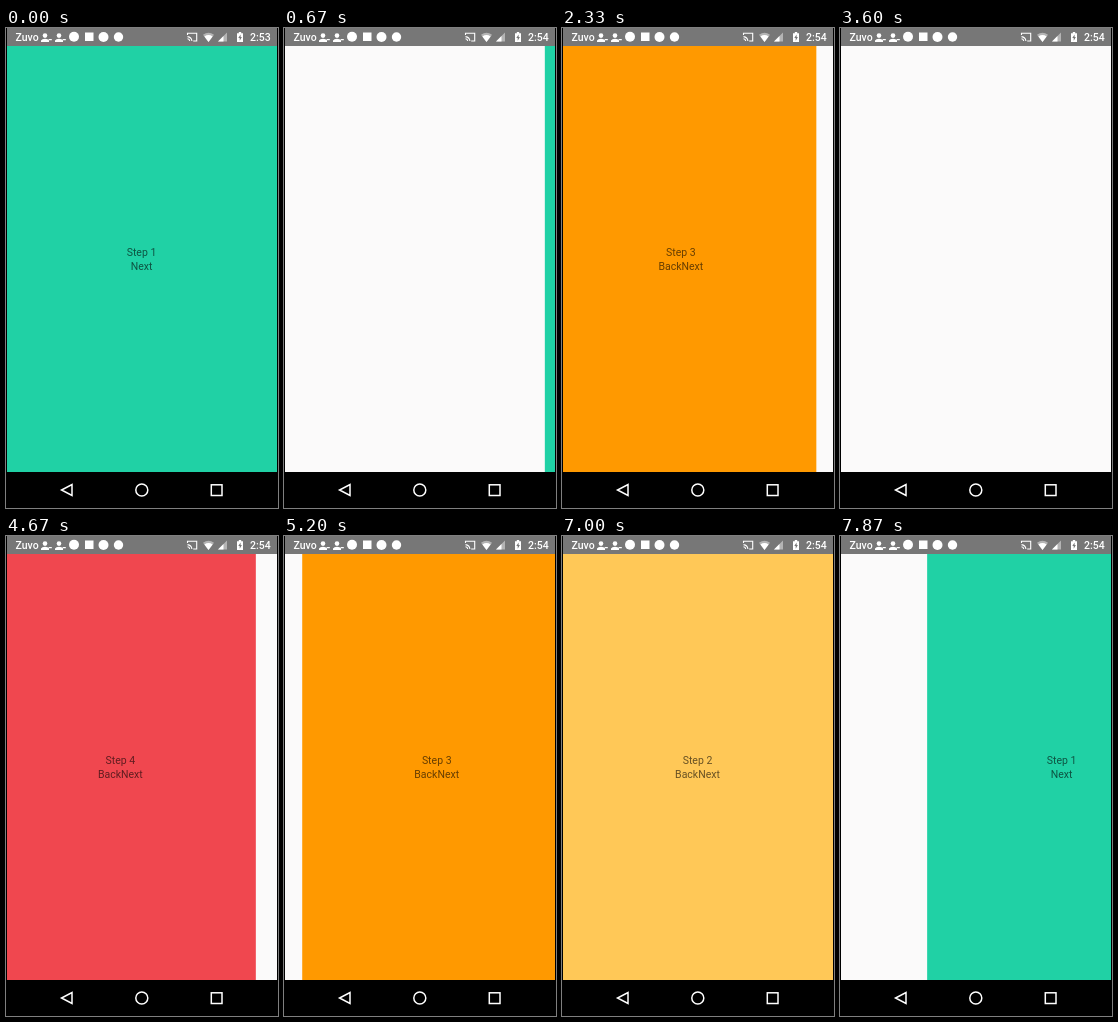
Animation of 272x480 px, one loop 7.94 s. Source, as an HTML page:

```html
<!DOCTYPE html>
<html lang="en">
<head>
<meta charset="utf-8">
<title>Step wizard</title>
<style>
  html, body { margin: 0; width: 100%; height: 100%; overflow: hidden; background: #000; }
  svg { display: block; width: 272px; height: 480px; }
  text { font: 10.5px Roboto, sans-serif; }
  #page text { text-anchor: middle; fill: rgba(0, 0, 0, .6); }
  #bar text { font-weight: 500; fill: #fff; }
</style>
</head>
<body>
<svg viewBox="0 0 272 480">
  <defs>
    <clipPath id="screen"><rect x="1" y="18" width="270" height="426"/></clipPath>
    <g id="person">
      <circle cx="4" cy="2.6" r="2.3"/>
      <path d="M0 9V7.6Q1 5.8 4 5.8T8 7.6V9ZM7.6 6h3.2v1.2H7.6Z"/>
    </g>
  </defs>

  <rect x="1" y="18" width="270" height="426" fill="#fbfafa"/>
  <g clip-path="url(#screen)">
    <g id="page">
      <rect id="fill" x="1" y="18" width="270" height="426"/>
      <text id="title" x="135.5" y="228"></text>
      <text x="135.5" y="242"><tspan id="back"></tspan><tspan id="next">Next</tspan></text>
    </g>
  </g>

  <g id="bar" fill="#fff">
    <rect x="1" width="270" height="18" fill="#777"/>
    <text x="9.5" y="13">Zuvo</text>
    <use href="#person" x="35" y="5"/>
    <use href="#person" x="49" y="5"/>
    <circle cx="68" cy="8.8" r="5"/>
    <rect x="79" y="4.5" width="8.5" height="8.5"/>
    <circle cx="97.5" cy="9" r="5"/>
    <circle cx="112.5" cy="9" r="4.7"/>
    <!-- cast, wifi, signal, battery -->
    <path d="M181.500 7V5.300h9.200v7.700h-3.500M181.500 8.600q4 .4 4.400 4.400M181.500 10.800q2 .2 2.200 2.200" fill="none" stroke="#fff" stroke-width="1.100"/>
    <path d="M197 6.700Q202.500 2.800 208 6.700L202.500 14Z" opacity=".45"/>
    <path d="M198.400 8.500Q202.500 5.700 206.600 8.500L202.500 14Z"/>
    <path d="M212 13.500 221 4.500V13.500Z" opacity=".45"/>
    <path d="M212 13.500 217.500 8V13.500Z"/>
    <path d="M231 5.200h1.800V4h2.400v1.200H237V14h-6Z"/>
    <path d="M234.600 6.500 232.300 10h1.400v2.700L235.900 9h-1.300Z" fill="#777"/>
    <text id="clock" x="244" y="13"></text>
  </g>

  <g fill="none" stroke="#fff" stroke-width="1.500">
    <path d="M66 456.500V467.500L55.500 462Z"/>
    <circle cx="135.800" cy="462" r="6"/>
    <rect x="205.300" y="456.800" width="10.700" height="10.700"/>
  </g>
</svg>
<script>
const LOOP = 7940, TICK = 200 / 3, SLIDE = 300, WIDTH = 270;
const COLORS = ['#20d1a5', '#ffc857', '#ff9900', '#f0474f'];
// step left, step entered, press, slide out, slide in (ms)
const MOVES = [
  [1, 2, 265, 440, 800],
  [2, 3, 1595, 1760, 2125],
  [3, 4, 2925, 3200, 3605],
  [4, 3, 4465, 4640, 4993],
  [3, 2, 5865, 6040, 6390],
  [2, 1, 7130, 7300, 7747]
];
const el = id => document.getElementById(id);
const [page, fill, title, back, next, clock] =
  ['page', 'fill', 'title', 'back', 'next', 'clock'].map(el);

// cubic-bezier(.25, .1, .25, 1)
function ease(p) {
  if (p <= 0) return 0;
  if (p >= 1) return 1;
  const curve = (u, a, b) => 3 * u * (1 - u) ** 2 * a + 3 * u * u * (1 - u) * b + u ** 3;
  let lo = 0, hi = 1;
  for (let i = 0; i < 20; i++) {
    const mid = (lo + hi) / 2;
    if (curve(mid, .25, .25) < p) lo = mid; else hi = mid;
  }
  return curve(lo, .1, 1);
}

function draw(t) {
  let step = 1, x = 0, pressed = null;
  for (const [from, to, press, out, enter] of MOVES) {
    if (t < press) break;
    const dir = Math.sign(to - from);
    if (t < enter) {
      step = from;
      x = dir * WIDTH * ease((t - out) / SLIDE);
      pressed = t < out ? (dir > 0 ? next : back) : null;
    } else {
      step = to;
      x = -dir * WIDTH * (1 - ease((t - enter) / SLIDE));
      pressed = null;
    }
  }
  page.setAttribute('transform', `translate(${x})`);
  fill.setAttribute('fill', COLORS[step - 1]);
  title.textContent = 'Step ' + step;
  back.textContent = step > 1 ? 'Back' : '';
  for (const b of [back, next]) b.setAttribute('fill-opacity', b === pressed ? .3 : 1);
  clock.textContent = t < 60 ? '2:53' : '2:54';
}

function frame() {
  const t = performance.now() % LOOP;
  draw(Math.floor((t + 4) / TICK) * TICK);
  requestAnimationFrame(frame);
}
frame();
</script>
</body>
</html>
```
